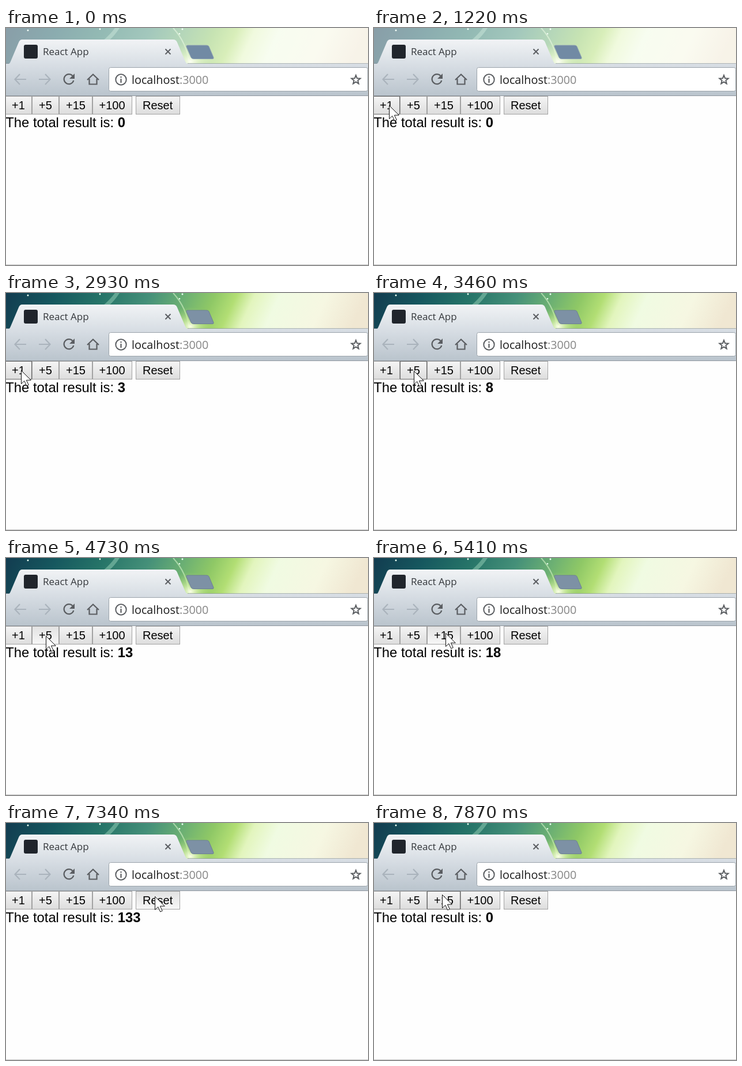
Recreate the animation shown at these times as an HTML page. Size 628 px wide and 411 px high, loop 8000 ms.

```html
<!DOCTYPE html>
<html lang="en">
<head>
<meta charset="utf-8">
<title>Counter</title>
<style>
html, body { margin: 0; width: 100%; height: 100%; overflow: hidden; background: #fefefe; }
svg { display: block; }
.ui { font-family: "Open Sans", "Noto Sans", sans-serif; }
.page { font-family: "Liberation Sans", Arial, sans-serif; }
.icon { fill: none; stroke: #5a5d61; stroke-width: 2.2; }
.off { stroke: #aab3bc; }
</style>
</head>
<body>
<svg width="628" height="411" viewBox="0 0 628 411">
  <defs>
    <linearGradient id="sky" gradientUnits="userSpaceOnUse" x1="0" y1="0" x2="628" y2="0" gradientTransform="skewX(-25)">
      <stop offset="0" stop-color="#123c50"/>
      <stop offset=".14" stop-color="#16585f"/>
      <stop offset=".27" stop-color="#267468"/>
      <stop offset=".4" stop-color="#459079"/>
      <stop offset=".5" stop-color="#6cb073"/>
      <stop offset=".58" stop-color="#8fc866"/>
      <stop offset=".64" stop-color="#b2de74"/>
      <stop offset=".69" stop-color="#e2f5bd"/>
      <stop offset=".76" stop-color="#f0fbe2"/>
      <stop offset=".89" stop-color="#f6f7e2"/>
      <stop offset="1" stop-color="#f0e7d2"/>
    </linearGradient>
    <radialGradient id="glow">
      <stop offset="0" stop-color="#fbffe8"/>
      <stop offset=".35" stop-color="#d5f0a5" stop-opacity=".7"/>
      <stop offset="1" stop-color="#a8d870" stop-opacity="0"/>
    </radialGradient>
    <linearGradient id="bar" gradientUnits="userSpaceOnUse" x1="0" y1="20" x2="0" y2="117">
      <stop offset="0" stop-color="#f1f3f5"/>
      <stop offset=".43" stop-color="#d9dfe5"/>
      <stop offset="1" stop-color="#bac4cd"/>
    </linearGradient>
    <linearGradient id="up" x2="0" y2="1">
      <stop offset="0" stop-color="#f5f5f5"/>
      <stop offset="1" stop-color="#dddddd"/>
    </linearGradient>
    <linearGradient id="down" x2="0" y2="1">
      <stop offset="0" stop-color="#e2e2e2"/>
      <stop offset="1" stop-color="#f7f7f7"/>
    </linearGradient>
    <clipPath id="top"><path d="M0 0H628V62H0Z"/></clipPath>
  </defs>

  <g clip-path="url(#top)">
    <path d="M0 0H628V62H0Z" fill="url(#sky)"/>
    <path d="M168 22Q180 12 189 0H197Q188 14 178 22Z" fill="#a5dcc0" opacity=".45"/>
    <path d="M318 62Q314 26 290 0" fill="none" stroke="#d8f5c8" stroke-width="2" opacity=".6"/>
    <ellipse cx="320" cy="58" rx="40" ry="34" fill="url(#glow)"/>
    <g fill="#e9fff4">
      <circle cx="38" cy="4" r="1.5"/><circle cx="163" cy="2" r="1.4"/>
      <circle cx="301" cy="10" r="1.3"/><circle cx="306" cy="2" r="1.5"/>
    </g>
    <path id="haze" d="M0 0H628V62H0Z" fill="#fff" opacity=".5"/>
  </g>

  <path id="newTab" d="M315 30H348Q351 30 352 32L360 51Q361 53.500 358 53.500H326Q322 53.500 321 51L313 32.500Q312 30 315 30Z"/>
  <path d="M0 62H5Q7 61 8 58L22 25Q24 20 28 20H290Q295 20 297 25L311 58Q312 61 315 62H628V117H0Z" fill="url(#bar)"/>
  <path d="M0 61.500H5M315 61.500H628" stroke="#7e8a94" opacity=".6"/>
  <path d="M0 117.500H628" stroke="#8f979e"/>
  <rect x="31" y="29" width="24" height="24" rx="3" fill="#20252c"/>
  <text class="ui" x="64" y="47" font-size="17" fill="#34373b">React App</text>
  <path class="icon" d="M276.500 36.500L285.500 45.500M285.500 36.500L276.500 45.500" style="stroke-width:1.9"/>

  <path class="icon off" d="M35 89H16M24 80L15.500 89L24 98"/>
  <path class="icon off" d="M57 89H76M68 80L76.500 89L68 98"/>
  <path class="icon" d="M115.500 83A8.500 8.500 0 1 0 117.300 91"/>
  <path d="M119 79V88H110Z" fill="#5a5d61"/>
  <path class="icon" d="M141 90L151 80.500L161 90M144.500 88V97.500H157.500V88"/>

  <rect x="178.500" y="68.500" width="449" height="41" rx="3" fill="#fff" stroke="#9ba3aa"/>
  <circle class="icon" cx="199.500" cy="89.500" r="9.200" style="stroke-width:2"/>
  <path class="icon" d="M199.500 88V95M199.500 84V86.300"/>
  <text class="ui" x="218" y="97" font-size="19.800" fill="#1c1c1c">localhost<tspan fill="#858585">:3000</tspan></text>
  <path id="star" class="icon" style="stroke-width:2"/>

  <g id="buttons" class="page" font-size="20"></g>
  <text class="page" x="-.7" y="172" font-size="23.800">The total result is: <tspan id="total" font-weight="bold">0</tspan></text>
  <path d="M0 410.500H628" stroke="#c6c6c6"/>
  <path id="cursor" d="M.5 .5V23.500L5.800 18.500L9.700 27L13.300 25.400L9.400 17.200H17.300Z" fill="#fff" stroke="#111"/>
</svg>

<script>
const LOOP = 8000, FOCUS = 1370;
const $ = id => document.getElementById(id);

// label, left, right, text x
const buttons = [
  ["+1", -2, 45, 10], ["+5", 45, 92, 57], ["+15", 92, 150, 104],
  ["+100", 150, 219, 161.5], ["Reset", 225, 302, 237]
].map(([label, left, right, x]) => {
  const add = (tag, attrs) => {
    const el = document.createElementNS("http://www.w3.org/2000/svg", tag);
    for (const key in attrs) el.setAttribute(key, attrs[key]);
    return $("buttons").appendChild(el);
  };
  const box = add("rect", { x: left + .5, y: 118.5, width: right - left - 1, height: 31 });
  add("text", { x, y: 141 }).textContent = label;
  return { box, left, right };
});

// press time, release time, button, total after release
const clicks = [
  [1370, 1440, 0, 1], [2070, 2230, 0, 2], [2760, 2930, 0, 3],
  [3380, 3460, 1, 8], [4090, 4240, 1, 13], [4730, 4880, 1, 18],
  [5410, 5490, 2, 33], [6090, 6170, 3, 133], [7340, 7490, 4, 0]
];

// first step, last step, number of steps, destination x, y, sag;
// the first move begins off stage, before the loop does
const moves = [
  [-520, 1000, 20, 28, 136, 0], [1140, 1220, 2, 26, 134, 0],
  [3005, 3305, 5, 69, 135, 0], [4950, 5160, 4, 124, 130, 0],
  [5565, 6020, 7, 188, 128, 0], [6400, 6790, 6, 258, 127, 0],
  [7640, 7870, 4, 118, 124, 7]
];

const easeInOut = p => p < .5 ? 2 * p * p : 1 - 2 * (1 - p) ** 2;

function pointer(t) {
  let x = 726, y = 752;
  for (const [start, end, count, toX, toY, sag] of moves) {
    if (t < start) break;
    const step = Math.floor((t - start) * (count - 1) / (end - start) + 1.001);
    const p = Math.min(step / count, 1), ease = easeInOut(p);
    x += (toX - x) * ease;
    y += (toY - y) * ease + sag * Math.sin(Math.PI * p);
  }
  return [Math.round(x), Math.round(y)];
}

function render(t) {
  const [x, y] = pointer(t);
  const focused = t >= FOCUS;
  let total = 0, pressed = -1;
  for (const [down, up, button, value] of clicks) {
    if (t >= up) total = value;
    else if (t >= down) pressed = button;
  }
  buttons.forEach(({ box, left, right }, i) => {
    const hover = x >= left && x < right && y >= 118 && y < 150;
    box.setAttribute("fill", i === pressed ? "url(#down)" : "url(#up)");
    box.setAttribute("stroke", hover && i !== pressed ? "#666" : "#a2a2a2");
  });
  $("total").textContent = total;
  $("haze").style.display = focused ? "none" : "";
  $("newTab").setAttribute("fill", focused ? "#7d91a5" : "#718aa4");
  $("newTab").setAttribute("stroke", focused ? "#6d8193" : "#8da1b2");
  $("cursor").setAttribute("transform", `translate(${x} ${y})`);
}

const starPoints = Array.from({ length: 10 }, (_, i) => {
  const r = i % 2 ? 3.5 : 8, a = i * Math.PI / 5;
  return `${607 + r * Math.sin(a)} ${90 - r * Math.cos(a)}`;
});
$("star").setAttribute("d", `M${starPoints.join("L")}Z`);

const begin = performance.now();
function tick() {
  render((performance.now() - begin) % LOOP);
  requestAnimationFrame(tick);
}
tick();
</script>
</body>
</html>
```
